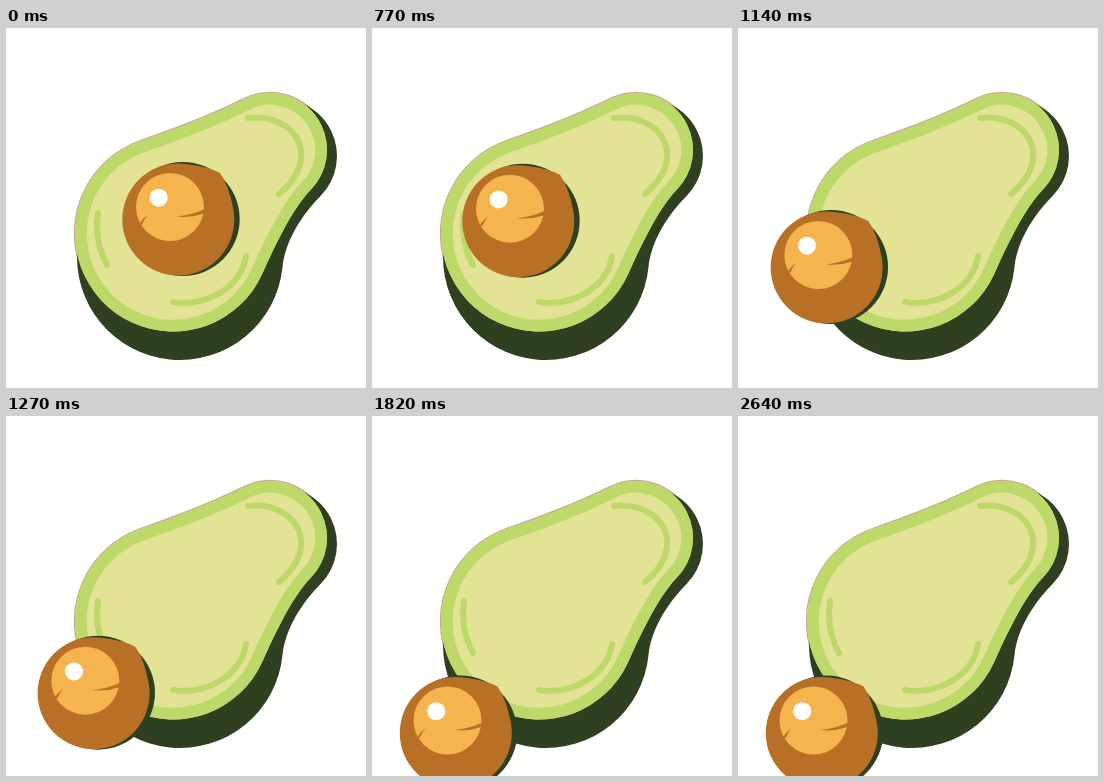
These frames come from a looping animation (360 by 360 pixels, 2.69 s). An HTML page with a canvas:

```html
<!DOCTYPE html>
<html lang="en">
<head>
<meta charset="utf-8">
<title>Avocado</title>
<style>
  html, body { margin: 0; width: 100%; height: 100%; overflow: hidden; background: #fff; }
  canvas { display: block; }
</style>
</head>
<body>
<canvas id="stage" width="360" height="360"></canvas>
<script>
const ctx = document.getElementById('stage').getContext('2d');
const LOOP = 2690, STEPS = 60, TAU = Math.PI * 2;
const LIME = '#bcd96a', FLESH = '#e2e394', SKIN = '#2e4020', RIM = '#c9a88e';
const PIT = '#b87026', GLOW = '#f5b44e', WHITE = '#fff';

const circle = (x, y, r) => ({ x, y, r });
const onCircle = (c, a) => [c.x + c.r * Math.cos(a), c.y + c.r * Math.sin(a)];

// Point off a circle, reached along its tangent at angle a.
function offCircle(c, a, distance) {
  const [x, y] = onCircle(c, a);
  return [x - Math.sin(a) * distance, y + Math.cos(a) * distance];
}

// Curve that leaves one circle and lands on the other, tangent to both.
function bridge(path, from, a, reach, to, b, land) {
  path.bezierCurveTo(...offCircle(from, a, reach), ...offCircle(to, b, -land), ...onCircle(to, b));
}

// Pear outline: a large belly circle and a small head circle joined by two waists.
function pear(belly, head, bellyStart) {
  const path = new Path2D(), bellyEnd = -1.9, headStart = -2.03, headEnd = 0.78;
  path.arc(belly.x, belly.y, belly.r, bellyStart, bellyEnd + TAU);
  bridge(path, belly, bellyEnd, 38, head, headStart, 36);
  path.arc(head.x, head.y, head.r, headStart, headEnd);
  bridge(path, head, headEnd, 27, belly, bellyStart, 26);
  path.closePath();
  return path;
}

const belly = circle(167, 205.5, 98), head = circle(264, 122, 57);
const face = pear(belly, head, 0.43);
const skin = pear(circle(174, 229, 103), circle(274, 128, 57), 0.1);

const shines = [
  'M92 185Q88 213 101 237',
  'M167 274C200 279 235 260 240 228',
  'M242 90C290 85 317 130 273 166'
].map(d => new Path2D(d));

const pit = new Path2D();
pit.arc(172.3, 191.5, 56, -0.2, -1.4 + TAU);
pit.quadraticCurveTo(203, 139, 214, 145);
pit.quadraticCurveTo(223, 158, 227.2, 180.4);
const cracks = new Path2D('M171 188.5Q185 187 198 181.5L198 185.5Q185 190 171 188.5Z' +
  'M142 187Q137 190 134 195L136 197Q138 191 142 187Z');

function fill(path, color) {
  ctx.fillStyle = color;
  ctx.fill(path);
}

function line(path, color, width) {
  ctx.strokeStyle = color;
  ctx.lineWidth = width;
  ctx.stroke(path);
}

function disc(x, y, r, color) {
  const path = new Path2D();
  path.arc(x, y, r, 0, TAU);
  fill(path, color);
}

function drawAvocado() {
  line(face, RIM, 2.4);
  fill(skin, SKIN);
  fill(face, FLESH);
  // Clipping keeps only the inner half of this wide stroke.
  ctx.save();
  ctx.clip(face);
  line(face, LIME, 23.5);
  ctx.restore();
  shines.forEach(path => line(path, LIME, 6));
}

function drawPit(x, y) {
  ctx.save();
  ctx.translate(x, y);
  disc(176.7, 191, 57, SKIN);
  fill(pit, PIT);
  disc(164, 179, 34, GLOW);
  fill(cracks, PIT);
  disc(152.7, 169.7, 9, WHITE);
  ctx.restore();
}

const progress = (step, from, to) => Math.min(1, Math.max(0, (step - from) / (to - from)));
const smooth = u => u * u * (3 - 2 * u);

function render(now) {
  const step = Math.floor((now % LOOP) / LOOP * STEPS);
  const roll = smooth(progress(step, 12, 25.5));
  const drift = smooth(progress(step, 25, 37));
  const drop = smooth(progress(step, 12, 32.5) ** 1.9);
  ctx.fillStyle = WHITE;
  ctx.fillRect(0, 0, 360, 360);
  drawAvocado();
  drawPit(-84 * roll - 4.5 * drift, 125.5 * drop);
}

ctx.lineCap = 'round';
const start = performance.now();
function tick() {
  render(performance.now() - start);
  requestAnimationFrame(tick);
}
tick();
</script>
</body>
</html>
```
